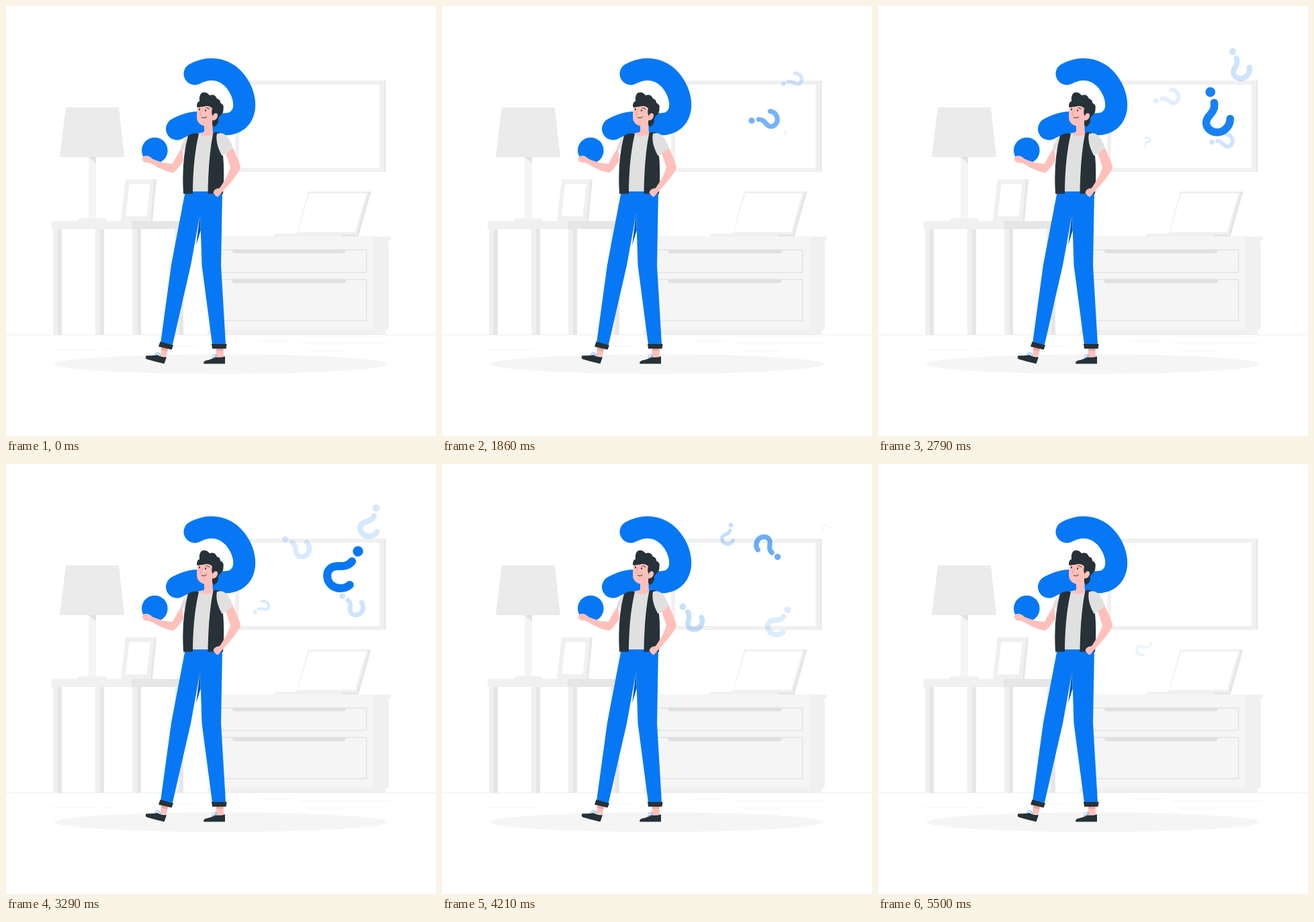
Recreate the animation shown at these times as an HTML page. Size 640 by 640 pixels, loop 8210 ms.

```html
<!DOCTYPE html>
<html lang="en">
<head>
<meta charset="utf-8">
<title>Questions</title>
<style>
  html, body { margin: 0; width: 100%; height: 100%; overflow: hidden; background: #fff; }
  svg { display: block; width: 100vw; height: 100vh; }
  .blue { fill: #0678f5; }
  .dark { fill: #263238; }
  .skin { fill: #ffc0bb; }
  .cloth { fill: #e0e0e0; }
  .g1 { fill: #f5f5f5; }
  .g2 { fill: #f0f0f0; }
  .g3 { fill: #e6e6e6; }
  .g4 { fill: #e0e0e0; }
  .white { fill: #fff; }
  .line { fill: none; stroke-linecap: round; stroke-linejoin: round; }
</style>
</head>
<body>
<svg viewBox="0 0 640 640">
  <defs>
    <g id="mark">
      <path class="line" stroke="#0678f5" stroke-width="12" d="M17-15C10-7 3-8-5-8C-14-8-20-2-20 6C-20 17-11 25 0 25C5 25 10 23 13.500 20"/>
      <circle class="blue" cx="26" cy="-30" r="7.700"/>
    </g>
  </defs>

  <!-- floor -->
  <path class="line" stroke="#ebebeb" stroke-width=".8" d="M0 489.500H640"/>
  <path class="line" stroke="#f2f2f2" stroke-width=".8" d="M68 511.500H138M148 511.500H157M249 506H284M374 498.500H424M437 501.500H571M448 513.500H502"/>

  <!-- picture on the wall -->
  <path class="g3" d="M345 111H565V247H345z"/>
  <path class="g2" d="M341 111H563V247H341z"/>
  <path class="white" d="M347 117H556V241H347z"/>

  <!-- lamp -->
  <path class="g1" d="M123 225H134V317H123z"/>
  <path class="g4" d="M123 225H134V234z"/>
  <path fill="#ebebeb" d="M89 151H168L176 225H80z"/>
  <path class="g2" d="M107 320Q107 316 112 316H145Q150 316 150 320z"/>

  <!-- photo frame -->
  <path class="g3" d="M184 258H224L218 320H178z"/>
  <path class="g2" d="M178 258H221L215 320H171z"/>
  <path class="white" d="M183.500 265H214.500L209.500 313H178z"/>

  <!-- table -->
  <path class="g2" d="M68 320H187V332H68zM70 332H77V489.500H70zM133 332H140V489.500H133zM188 332H195V489.500H188zM251 332H258V489.500H251z"/>
  <path class="g3" d="M187 320H266V332H187zM77 332H83V489.500H77zM140 332H146V489.500H140zM195 332H201V489.500H195zM258 332H264V489.500H258z"/>

  <!-- cabinet -->
  <path class="g2" d="M300 482H565V489.500H300zM546 349H569.500V482H546z"/>
  <path class="g1" d="M302 349H547V482H302zM296 343H548V349H296z"/>
  <path class="g2" d="M548 343H573V349H548z"/>
  <path class="line" stroke="#e3e3e3" stroke-width="1.500" d="M310 363H536.500V396.500H310zM310 407H536.500V468.500H310z"/>
  <path class="g4" d="M336 363H506Q506 368 501 368H341Q336 368 336 363zM336 407.500H506Q506 412.500 501 412.500H341Q336 412.500 336 407.500z"/>

  <!-- laptop -->
  <path class="g3" d="M455 276H543.500L525 342H437z"/>
  <path class="g2" d="M450 276H540L521 341H432z"/>
  <path class="white" d="M451.500 279H536.500L519.500 336.500H434z"/>
  <path class="g2" d="M398 343Q398 339 403 339H525V343z"/>
  <path class="g3" d="M499 340H525V343H501z"/>

  <ellipse class="g1" cx="320" cy="533" rx="248" ry="14.500"/>

  <g id="marks"></g>

  <!-- large question mark -->
  <path class="line" stroke="#0678f5" stroke-width="33" d="M281 101C305 88 330 94 345 117C361 141 359 176 325 176C300 177 285 166 254.500 183"/>
  <circle class="blue" cx="221.300" cy="215" r="19.300"/>

  <!-- shoes and ankles -->
  <path class="skin" d="M231 508L241 510L238.500 522L230 520zM313 508H323.500L324 523H312z"/>
  <path fill="#eba39e" d="M231.500 508L241 510L240 514L231 511.500zM313 509H323.500V513H313z"/>
  <path class="dark" d="M208.500 520.500Q218 520.500 226 519.500Q231 523 239 522.500L235.500 532.500Q222 529.500 209 525.500Q207 523 208.500 520.500zM294 532Q294 528.500 298 527.500Q306 526 311 522.500Q319 524 326 521.500V532.500H295z"/>
  <path class="line" stroke="#5ba5f5" stroke-width=".9" d="M222 518Q226 514 228 517Q227 521 222 518M228 517L231 521M307 521Q311 517 313 520Q311 524 307 523M313 520L311 524"/>

  <!-- trousers -->
  <path class="blue" d="M267 275H322L320 386L327 504H307L291.500 386L289 309L275 386L247 508L230 502L246 385z"/>
  <path fill="#0454ae" d="M289 308L283 356L289.700 334z"/>
  <path class="dark" d="M229.500 499.500L249 505L246.500 511.500L227 507zM306 503H328.500L327.500 510H307z"/>

  <!-- neck, shirt and arms -->
  <path class="cloth" d="M273 192Q264 197 260 211L266 216zM278 192Q290 188 296 188H316L310 276H272z"/>
  <path class="skin" d="M295 174V187Q290 189 288 191Q298 197 309 190Q307 188 307.500 172z"/>
  <path class="skin" d="M262 210L247.500 235Q232 234 218 227.500Q212 222 208 223Q203 223 203 226Q202 232 208 233Q216 233 222 238Q238 247 249 248Q257 242 264 230z"/>
  <path class="dark" d="M271 193Q278 188 287 190Q278 228 278 279.500H264Q261 230 271 193zM308.500 188H318Q327 230 323 279.500H300.500Q301 225 308.500 188z"/>
  <path class="skin" d="M327 219L337 210Q349 235 349 241Q346 250 323.500 275L315 284.500Q311 282 308.500 278Q309 272 318 271Q331 252 334 240z"/>
  <path class="cloth" d="M314 190Q329 185 337.500 210.500Q331 219 321.500 223Q311 204 314 190z"/>

  <!-- head -->
  <path class="skin" d="M286 146Q283 160 284.500 170Q289 179 297 178.500Q305 179 309 170L313 150L300 140z"/>
  <path class="dark" d="M284 150Q284 142 288 142Q287 134 290.500 130Q297 126 303 133Q311 130 314 138Q319 139 319 144Q325 147 323.500 153Q324 159 319 163Q315 166 316 171Q315 177 310 180Q306 178 307 172L308 164Q305 160 307 152Q302 148 297 149Q290 151 284 150z"/>
  <path class="skin" d="M307.500 164Q310 158 314 160Q317 164 312 169Q309 171 307 170z"/>
  <g class="dark"><ellipse cx="288" cy="154" rx="1" ry="1.400"/><ellipse cx="297" cy="155.500" rx="1" ry="1.400"/></g>
  <path class="line" stroke="#263238" stroke-width="1" d="M285.500 151L288 150M298 151.500Q301 151.500 303 153.500M291.500 166Q295.500 168 298.500 165"/>
  <path class="line" stroke="#e58f8a" stroke-width=".9" d="M292 155Q290 159 288.500 161.500L291 162.500"/>
</svg>
<script>
  const LOOP = 8210, START = 860, END = 5500, STEP = (END - START) / 65;
  const TIMES = [1290, 2290, 3290, 4210, 4930, 5500];
  const layer = document.getElementById('marks');
  const marks = [];

  // rows: x, y, scale, angle, opacity at successive TIMES
  function addMark(born, gone, first, rows) {
    const keys = rows.map((r, i) => [TIMES[first + i], ...r]);
    const n = keys.length;
    keys.unshift(beyond(keys[0], keys[1], born, 0.6));
    keys.push(beyond(keys[n], keys[n - 1], gone, 0));
    const el = document.createElementNS('http://www.w3.org/2000/svg', 'use');
    el.setAttribute('href', '#mark');
    layer.append(el);
    marks.push({ el, keys });
  }

  // carry the drift on to the moment where the size is zero
  function beyond(a, b, t, fade) {
    const k = 0.5 * (t - a[0]) / (b[0] - a[0]);
    const on = i => a[i] + (b[i] - a[i]) * k;
    return [t, on(1), on(2), 0, on(4), a[5] * fade];
  }

  function slope(keys, i, c) {
    const a = keys[Math.max(i - 1, 0)], b = keys[Math.min(i + 1, keys.length - 1)];
    return (b[c] - a[c]) / (b[0] - a[0]);
  }

  function valueAt(keys, i, c, t) {
    const a = keys[i], b = keys[i + 1], d = b[0] - a[0], u = (t - a[0]) / d;
    const v = 1 - u;
    return a[c] * v * v * (1 + 2 * u) + b[c] * u * u * (3 - 2 * u)
      + d * u * v * (v * slope(keys, i, c) - u * slope(keys, i + 1, c));
  }

  addMark(790, 5070, 0, [
    [463, 175, .28, -169, .28], [498, 167, .8, -97, .75], [498, 160, 1, 0, 1],
    [483, 121, .61, 95, .6], [461, 87, .14, 165, .08]]);
  addMark(790, 4290, 0, [
    [510, 129, .26, -196, .12], [535, 99, .55, -107, .2],
    [539.5, 90.5, .69, -16, .16], [571, 94, .23, 49, .05]]);
  addMark(1790, 5180, 1, [
    [432, 148, .36, -181, .07], [436, 126, .62, -96, .15],
    [424.5, 108, .45, -23, .23], [404, 87.5, .14, 9, .35]]);
  addMark(1700, 5040, 1, [
    [512.5, 193.5, .34, -172, .17], [517, 213, .58, -86, .2],
    [498, 237.5, .66, -3, .13], [479, 262.5, .2, 34, .05]]);
  addMark(2220, 5750, 1, [
    [422, 188, .04, -220, .1], [383, 213, .36, -161, .15], [372, 232.7, .62, -75, .23],
    [373.5, 252.6, .67, -7, .14], [393, 275, .37, 21, .07]]);

  function draw(t) {
    const n = Math.floor((t - START + 6) / STEP);
    const at = Math.min(START + n * STEP, END);
    for (const { el, keys } of marks) {
      const i = keys.findIndex((k, j) => j < keys.length - 1 && at >= k[0] && at < keys[j + 1][0]);
      const shown = n >= 0 && i >= 0;
      el.style.display = shown ? '' : 'none';
      if (!shown) continue;
      const [x, y, s, turn, alpha] = [1, 2, 3, 4, 5].map(c => valueAt(keys, i, c, at));
      el.setAttribute('transform', `translate(${x} ${y}) rotate(${turn}) scale(${Math.max(s, 0)})`);
      el.setAttribute('opacity', Math.min(1, Math.max(0, alpha)));
    }
  }

  const begin = performance.now();
  function tick() {
    draw((performance.now() - begin) % LOOP);
    requestAnimationFrame(tick);
  }
  tick();
</script>
</body>
</html>
```
